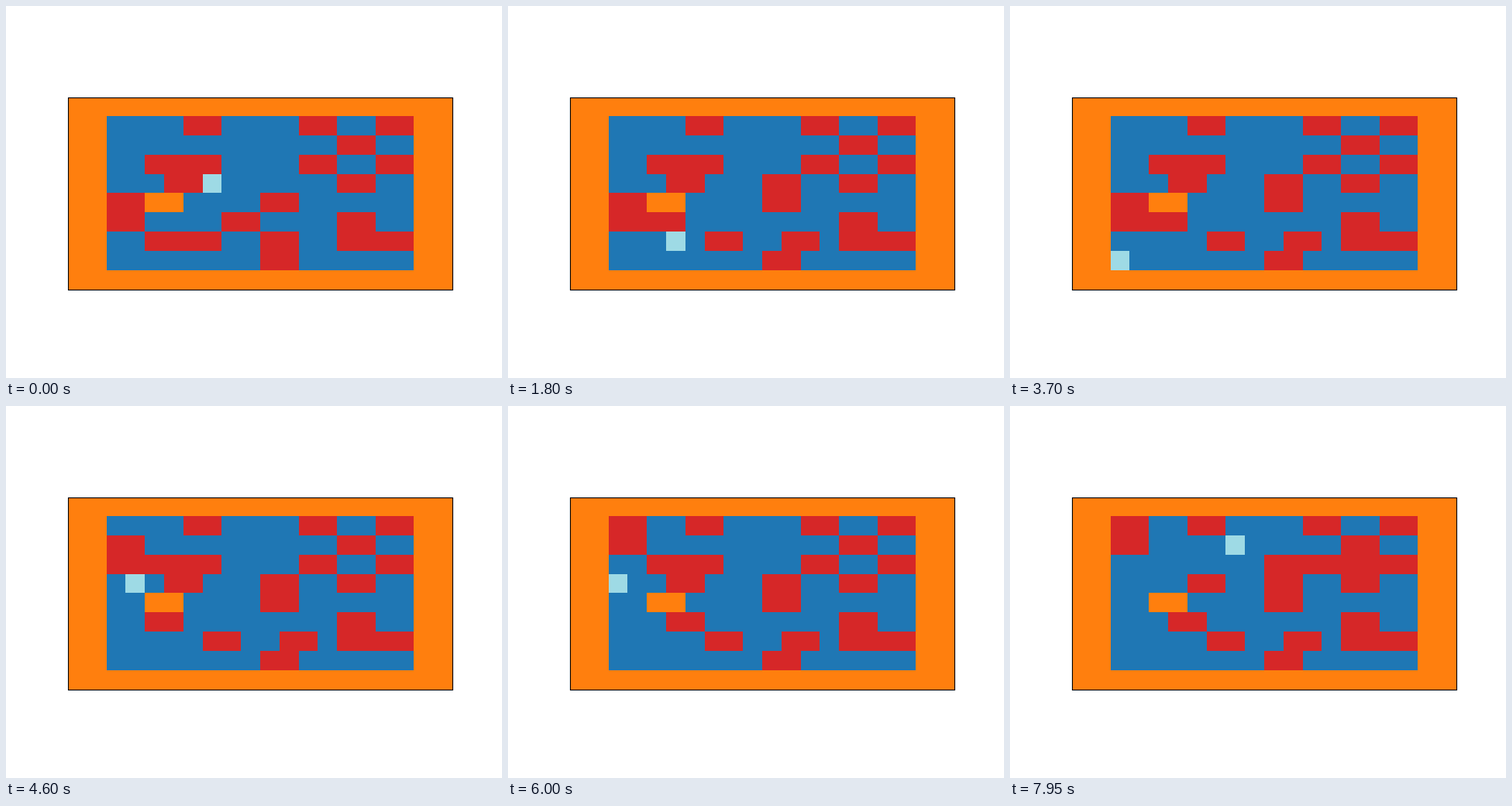
Write an HTML page with a canvas that moves like this. It is 640x480 px and loops after 8000 ms.

```html
<!DOCTYPE html>
<html lang="en">
<head>
<meta charset="utf-8">
<title>Box pushing robot</title>
<style>
  html, body { margin: 0; width: 100%; height: 100%; overflow: hidden; background: #fff; }
  canvas { display: block; }
</style>
</head>
<body>
<canvas id="stage" width="640" height="480"></canvas>
<script>
const STEP = 50;
const CELL = 24.8;
const COLORS = { '.': '#1f77b4', '#': '#ff7f0e', '[': '#d62728', ']': '#d62728', '@': '#9edae5' };
const WIDE = { '#': '##', 'O': '[]', '.': '..', '@': '@.' };
const DIRS = { '<': [0, -1], '>': [0, 1], '^': [-1, 0], 'v': [1, 0] };

const MAP = [
  '##########',
  '#..O..O.O#',
  '#......O.#',
  '#.OO..O.O#',
  '#..O@..O.#',
  '#O#..O...#',
  '#O..O..O.#',
  '#.OO.O.OO#',
  '#....O...#',
  '##########'
];

const MOVES =
  '<vv>^<v^>v>^vv^v>v<>v^v<v<^vv<<<^><<><>>v<vvv<>^v^>^<<<><<v<<<v^vv^v>^' +
  'vvv<<^>^v^^><<>>><>^<<><^vv^^<>vvv<>><^^v>^>vv<>v<<<<v<^v>^<^^>>>^<v<v' +
  '><>vv>v^v^<>><>>>><^';

// Moves the robot and everything it pushes, or returns the grid unchanged.
function push(grid, [dr, dc]) {
  const r0 = grid.findIndex(row => row.includes('@'));
  const moved = [[r0, grid[r0].indexOf('@')]];
  const seen = new Set([moved[0].join()]);
  const add = (r, c) => {
    const key = r + ',' + c;
    if (!seen.has(key)) {
      seen.add(key);
      moved.push([r, c]);
    }
  };
  for (const [r, c] of moved) {
    const nr = r + dr, nc = c + dc;
    const tile = grid[nr][nc];
    if (tile === '#') return grid;
    if (tile === '[' || tile === ']') {
      add(nr, nc);
      add(nr, nc + (tile === '[' ? 1 : -1));
    }
  }
  const next = grid.map(row => row.slice());
  for (const [r, c] of moved) next[r][c] = '.';
  for (const [r, c] of moved) next[r + dr][c + dc] = grid[r][c];
  return next;
}

const states = [];
let grid = MAP.map(row => [...row].flatMap(ch => [...WIDE[ch]]));
for (const move of MOVES) {
  grid = push(grid, DIRS[move]);
  states.push(grid);
}

const ctx = document.getElementById('stage').getContext('2d');
const edgeX = c => Math.round(80 + CELL * c);
const edgeY = r => Math.round(117.4 + CELL * r);

function draw(state) {
  ctx.fillStyle = '#fff';
  ctx.fillRect(0, 0, 640, 480);
  ctx.fillStyle = COLORS['#'];
  ctx.fillRect(80, 118, 496, 248);
  state.forEach((row, r) => row.forEach((tile, c) => {
    if (tile === '#') return;
    const x = edgeX(c), y = edgeY(r);
    ctx.fillStyle = COLORS[tile];
    ctx.fillRect(x, y, edgeX(c + 1) - x, edgeY(r + 1) - y);
  }));
  ctx.strokeStyle = '#000';
  ctx.lineWidth = 1.11;
  ctx.strokeRect(80.5, 118.5, 496, 248);
}

const start = performance.now();
function frame() {
  const step = Math.floor((performance.now() - start) / STEP) % states.length;
  draw(states[step]);
  requestAnimationFrame(frame);
}
frame();
</script>
</body>
</html>
```
